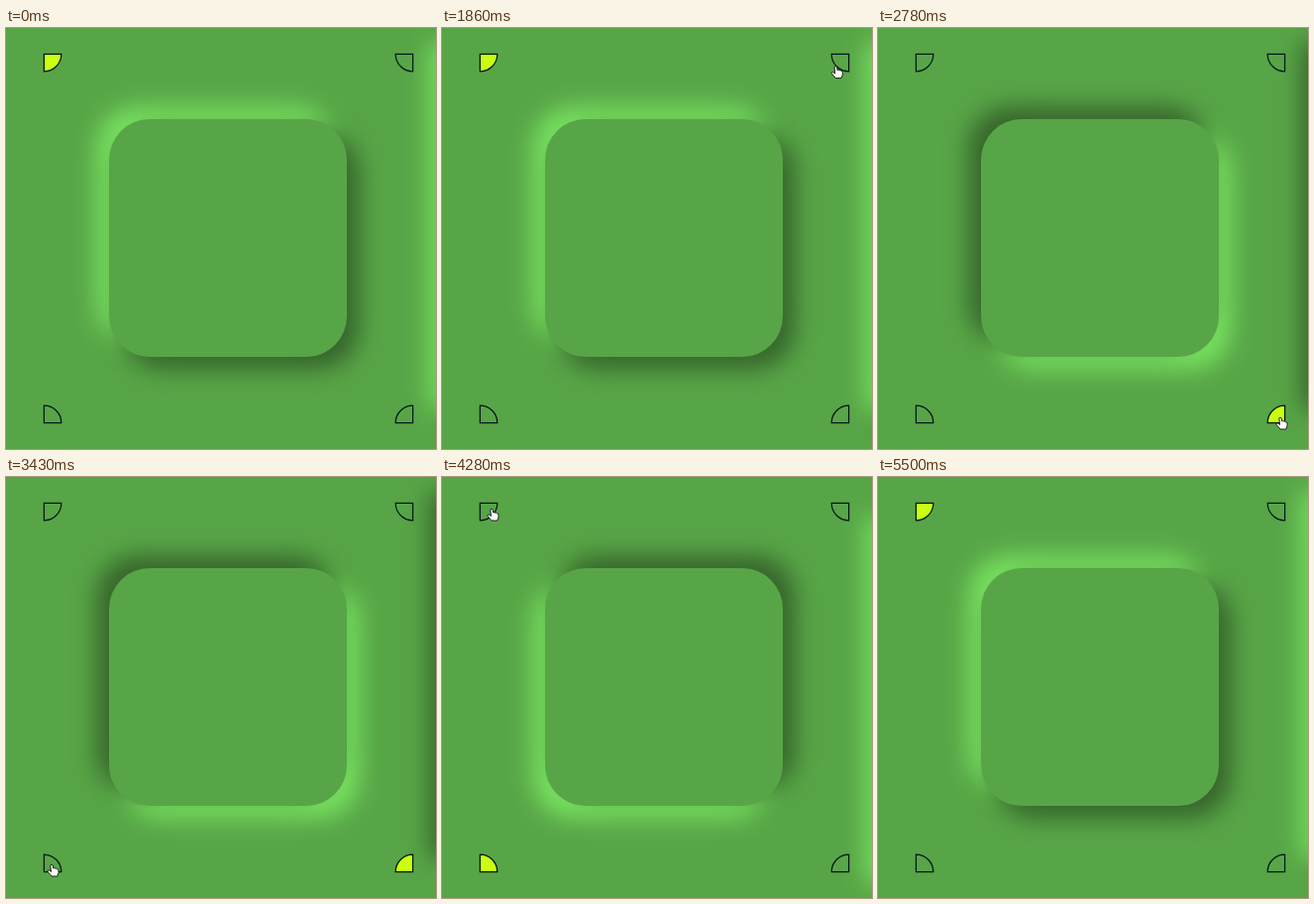
Animation, 434 px wide and 425 px high, one loop 5.67 s. Source, as an HTML page:

```html
<!DOCTYPE html>
<html lang="en">
<head>
<meta charset="utf-8">
<title>Soft shadow light source</title>
<style>
  html, body { margin: 0; width: 100%; height: 100%; overflow: hidden; background: #58a547; }
  #stage { position: relative; width: 434px; height: 425px; overflow: hidden; background: #58a547; }
  .soft {
    position: absolute; background: #58a547;
    box-shadow:
      calc(var(--x) * 12px) calc(var(--y) * 12px) 24px #35632b,
      calc(var(--x) * -12px) calc(var(--y) * -12px) 24px #7be763;
  }
  #tile { left: 104px; top: 92px; width: 240px; height: 240px; border-radius: 41px; }
  #panel { left: 440px; top: 26px; width: 300px; height: 373px; border-radius: 10px; }
  svg { position: absolute; inset: 0; }
  .corner { fill: none; stroke: #04191a; stroke-width: 1.25; }
  .corner.on { fill: #cbff12; }
  #cursor path { fill: #fff; stroke: #111; stroke-width: .9; stroke-linejoin: round; }
</style>
</head>
<body>
<div id="stage">
  <div class="soft" id="tile"></div>
  <div class="soft" id="panel"></div>
  <svg width="434" height="425">
    <g id="corners"></g>
    <g id="cursor">
      <path id="arrow" d="M0 0V11L2.6 8.7L4.3 12.4L6 11.6L4.4 8H8Z"/>
      <path id="hand" d="M-1.2 .8Q0-.6 1.2 .8L1.7 4Q3 3 3.8 4.3Q5 3.6 5.6 4.8Q7 4.6 7 6V8.5L5.8 12H0L-4 7.2Q-4.2 5.6-2.6 6L-.5 7.4Z"/>
    </g>
  </svg>
</div>
<script>
const LOOP = 5670;
const $ = id => document.getElementById(id);

// Shadow direction: [x, y] points away from the lit corner
const lights = [[1, 1], [-1, 1], [-1, -1], [1, -1]];
const clicks = [[0, 0], [2040, 1], [2680, 2], [3530, 3], [4370, 0]];

// Pointer positions: time, x, y
const path = [
  [1400, 130, 128], [1900, 402, 37], [2130, 402, 37], [2600, 406, 393],
  [2860, 406, 393], [3290, 46, 391], [3850, 46, 391], [4270, 50, 32], [4830, 50, 32]
];

const corners = lights.map(([x, y]) => {
  const p = document.createElementNS('http://www.w3.org/2000/svg', 'path');
  const cx = x > 0 ? 38.4 : 410.6, cy = y > 0 ? 26.4 : 398.6;
  p.setAttribute('d', `M${cx} ${cy}h${17.4 * x}A17.4 17.4 0 0 ${x * y > 0 ? 1 : 0} ${cx} ${cy + 17.4 * y}Z`);
  $('corners').append(p);
  return p;
});

const ease = u => u * u * (3 - 2 * u);

function pointerAt(t) {
  const i = path.findIndex(p => p[0] > t);
  if (i < 1) return null;
  const [t0, x0, y0] = path[i - 1], [t1, x1, y1] = path[i];
  const u = ease((t - t0) / (t1 - t0));
  return [x0 + (x1 - x0) * u, y0 + (y1 - y0) * u];
}

const overCorner = (x, y) => (x < 56 || x > 393) && (y < 44 || y > 381);

function draw(now) {
  const t = now % LOOP;
  const lit = clicks.filter(c => c[0] <= t).pop()[1];
  $('stage').style.setProperty('--x', lights[lit][0]);
  $('stage').style.setProperty('--y', lights[lit][1]);
  corners.forEach((p, i) => p.setAttribute('class', i === lit ? 'corner on' : 'corner'));

  const at = pointerAt(t);
  $('cursor').style.display = at ? '' : 'none';
  if (at) {
    const hand = overCorner(...at);
    $('cursor').setAttribute('transform', `translate(${at})`);
    $('hand').style.display = hand ? '' : 'none';
    $('arrow').style.display = hand ? 'none' : '';
  }
}

const start = performance.now();
function frame() {
  draw(performance.now() - start);
  requestAnimationFrame(frame);
}
frame();
</script>
</body>
</html>
```
